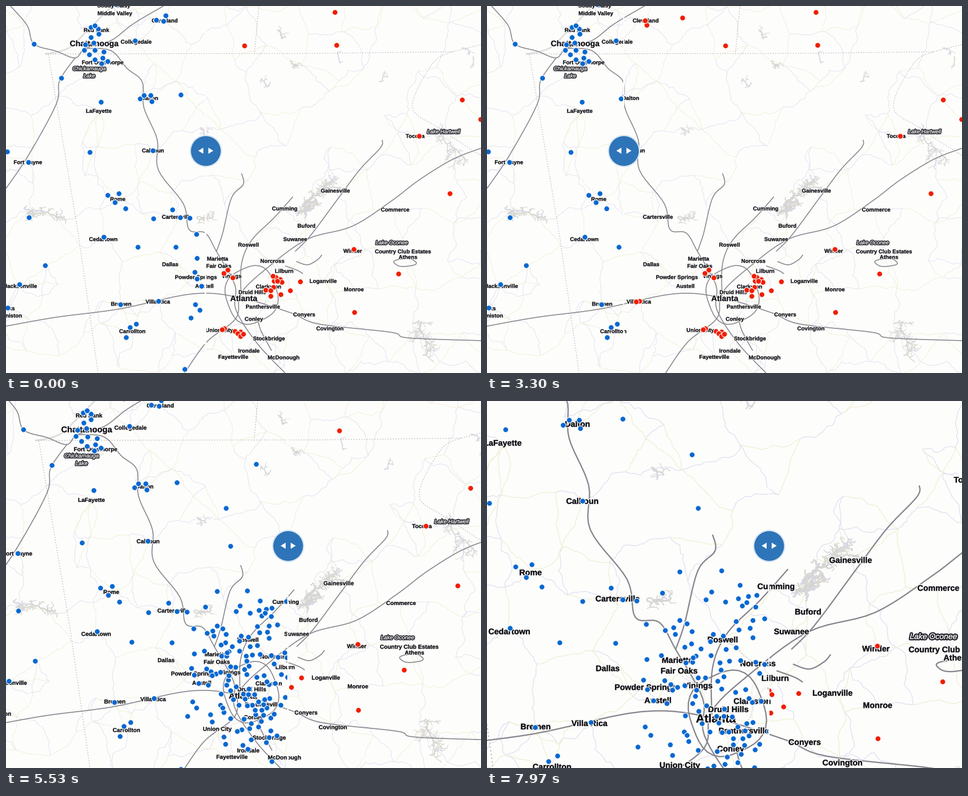
A matplotlib script for the animation above (8000 ms loop, 851 px wide and 658 px high).

```python
import math
import random

import numpy as np
import matplotlib.pyplot as plt
from matplotlib.animation import FuncAnimation
from matplotlib.collections import LineCollection, PathCollection
from matplotlib.patches import Circle, Polygon, Rectangle
from matplotlib.path import Path
from matplotlib.textpath import TextPath
from matplotlib.transforms import Bbox, TransformedBbox

W, H, DPI = 851, 658, 100
FRAMES, STEP = 200, 40
PX = 72 / DPI
CENTER = (460, 428.6)
PAPER = "#fdfdfc"

fig = plt.figure(figsize=(W / DPI, H / DPI), dpi=DPI, facecolor=PAPER)


def stage(z):
    ax = fig.add_axes([0, 0, 1, 1], zorder=z)
    ax.set_xlim(0, W)
    ax.set_ylim(H, 0)
    ax.axis("off")
    return ax


world, over = stage(1), stage(2)
scaled = []  # (collection, widths at zoom 1)


def add_lines(lines, widths, colors, z, **kw):
    col = LineCollection(lines, colors=colors, zorder=z, **kw)
    world.add_collection(col, autolim=False)
    scaled.append((col, np.atleast_1d(widths) * PX))


def smooth(pts, n=7):
    """Catmull-Rom curve through the points."""
    p = np.array([pts[0], *pts, pts[-1]], float)
    t = np.linspace(0, 1, n, endpoint=False)[:, None]
    out = []
    for a, b, c, d in zip(p, p[1:], p[2:], p[3:]):
        out.append(0.5 * (2 * b + (c - a) * t + (2 * a - 5 * b + 4 * c - d) * t**2
                          + (3 * b - a - 3 * c + d) * t**3))
    out.append(p[-1:])
    return np.vstack(out)


# ---- towns: name, label centre and, outside the metro area, number of sites
NORTH = [
    ("Soddy Daisy", 193, -1, 1), ("Middle Valley", 195, 13), ("Red Bank", 162, 43, 4),
    ("Cleveland", 284, 26, 3), ("Collegedale", 233, 64, 1), ("Fort Oglethorpe", 173, 101, 4),
    ("Dalton", 257, 165, 4), ("LaFayette", 166, 188), ("Calhoun", 263, 259, 1),
    ("Fort Payne", 39, 280, 1), ("Rome", 200, 346, 4), ("Cartersville", 306, 378, 2),
    ("Cedartown", 174, 418, 1), ("Gainesville", 590, 331, 2), ("Cumming", 499, 363, 1),
    ("Buford", 538, 394, 3), ("Suwanee", 518, 418, 1), ("Commerce", 697, 365, 2),
    ("Toccoa", 733, 233), ("Roswell", 434, 428),
]
SOUTH = [
    ("Dallas", 294, 463), ("Powder Springs", 340, 486), ("Austell", 355, 502),
    ("Bremen", 206, 534, 1), ("Villa Rica", 272, 530, 1), ("Carrollton", 226, 583, 3),
    ("Jacksonville", 26, 502, 1), ("Saks", 4, 542, 1), ("Anniston", 7, 555),
    ("Union City", 382, 581), ("Marietta", 379, 453), ("Fair Oaks", 381, 466),
    ("Vinings", 404, 484), ("Norcross", 477, 457), ("Lilburn", 498, 475),
    ("Clarkston", 470, 503), ("Druid Hills", 441, 513), ("Panthersville", 460, 539),
    ("Conley", 444, 561), ("Conyers", 534, 553, 4), ("Covington", 580, 578, 1),
    ("Stockbridge", 471, 596), ("Irondale", 435, 618), ("Fayetteville", 407, 629),
    ("McDonough", 497, 630), ("Winder", 621, 439, 1), ("Country Club Estates", 711, 440),
    ("Athens", 720, 450), ("Monroe", 623, 508, 1), ("Loganville", 568, 493, 1),
]
METROS = [("Chattanooga", 158, 67, 7), ("Atlanta", 426, 524)]
LAKE_NAMES = [("Chickamauga", 149, 112), ("Lake", 149, 125),
              ("Lake Hartwell", 784, 225), ("Lake Oconee", 691, 424)]
TOWNS = NORTH + SOUTH

# ---- faint back roads and streams, each place linked to its neighbours
rng = random.Random(11)


def rough(a, b, amp):
    """Straight run from a to b bent by midpoint displacement."""
    pts = [a, b]
    for _ in range(4):
        nxt = [pts[0]]
        for p, q in zip(pts, pts[1:]):
            d = math.dist(p, q) * amp
            nxt += [((p[0] + q[0]) / 2 + rng.gauss(0, d),
                     (p[1] + q[1]) / 2 + rng.gauss(0, d)), q]
        pts = nxt
    return pts


nodes = [town[1:3] for town in TOWNS + METROS]
for gx in range(-20, 900, 68):
    for gy in range(-20, 700, 66):
        nodes.append((gx + rng.uniform(-26, 26), gy + rng.uniform(-26, 26)))

links = set()
for i, p in enumerate(nodes):
    near = sorted(range(len(nodes)), key=lambda j: math.dist(p, nodes[j]))
    links |= {(min(i, j), max(i, j)) for j in near[1:4]}
links = sorted(links)
for part, bend, tint in ((links[1::2], 0.10, "#e1e0f0"), (links[::2], 0.07, "#f0efd2")):
    add_lines([rough(nodes[i], nodes[j], bend) for i, j in part], 0.9, tint, 1)

# ---- lakes grown as branching walks
rng = random.Random(4)
shore, shore_w, shore_c = [], [], []
TINTS = ("#d6d5d3", "#d6d5d3", "#d8d8e4", "#dedccb")


def lake(x, y, heading, n, w=1.8, depth=2):
    ang, pts = math.radians(heading), [(x, y)]
    for _ in range(n):
        a = ang + rng.gauss(0, 0.7)
        x, y = x + 3.2 * math.cos(a), y + 3.2 * math.sin(a)
        pts.append((x, y))
        if depth and rng.random() < 0.45:
            side = heading + rng.choice((-1, 1)) * rng.uniform(50, 100)
            lake(x, y, side, rng.randint(2, max(3, n // 3)), w * 0.75, depth - 1)
    shore.append(pts)
    shore_w.append(w)
    shore_c.append(rng.choice(TINTS))


for k in range(5):
    lake(520 + 3 * k, 376 - 5 * k, -32, 13, 2.8)
for arm in (-75, -45, -20):
    lake(560, 340, arm, 17)
for arm in (180, 200, 15):
    lake(72, 370, arm, 14, 2.4)
for arm in (10, -35):
    lake(342, 378, arm, 12)
lake(768, 222, 38, 30)
lake(746, 565, 82, 28)
for x, y in ((486, 42), (508, 100), (594, 82), (456, 130), (347, 218), (816, 76),
             (838, 90), (668, 135)):
    lake(x, y, rng.uniform(0, 70), 7)
add_lines(shore, shore_w, shore_c, 2)
add_lines([smooth([(190, 0), (140, 50), (118, 72), (94, 82), (70, 86)])], 2.6, "#deddd8", 2)

# ---- state lines
BORDERS = [
    [(70, 86), (560, 85), (800, 82), (851, 69)],
    [(76, 87), (130, 412), (165, 658)],
    [(453, 0), (445, 86)],
    smooth([(800, 82), (765, 102), (728, 180), (772, 217), (851, 268)]),
]
add_lines(BORDERS, 1.1, "#aeadb0", 3, linestyles=[(0, (1.5, 2.6))])

# ---- highways
highways = []


def road(*pts):
    highways.append(smooth(pts))


def ring(cx, cy, rx, ry):
    a = np.linspace(0, 2 * math.pi, 40)
    wob = 1 + 0.05 * np.sin(4 * a)
    highways.append(np.column_stack([cx + rx * wob * np.cos(a), cy + ry * wob * np.sin(a)]))


road((8, 0), (38, 35), (50, 68), (90, 81), (124, 93), (142, 76), (188, 62), (228, 32), (282, 0))
road((142, 76), (188, 80), (217, 112), (244, 136), (247, 182), (271, 240), (273, 294),
     (318, 355), (328, 401), (357, 407), (377, 440), (410, 500), (412, 545), (450, 605),
     (500, 658))
road((124, 93), (96, 134), (90, 176), (40, 268), (0, 327))
road((0, 574), (90, 558), (204, 543), (335, 516), (420, 523), (510, 550), (560, 570),
     (690, 585), (720, 595), (851, 600))
road((320, 658), (360, 602), (412, 560), (421, 515), (470, 468), (540, 418), (620, 395),
     (690, 350), (740, 312), (800, 275), (851, 255))
road((518, 440), (546, 411), (598, 341), (635, 292), (671, 254), (674, 240))
road((421, 520), (422, 462), (440, 420), (480, 380), (514, 342))
road((377, 440), (388, 408), (404, 344), (425, 320), (422, 300))
road((452, 567), (458, 585), (476, 618))
road((500, 466), (522, 474), (532, 480))
road((520, 458), (540, 464), (558, 455), (566, 446))
ring(440, 518, 47, 52)
ring(715, 460, 20, 7)
add_lines(highways, 1.6, "#87868d", 4)


# ---- labels as outlines, so they grow with the map
def outline(town, size, **font):
    name, x, y = town[:3]
    tp = TextPath((0, 0), name, size=size, prop=dict(family="Liberation Sans", **font))
    v = tp.vertices
    mid = (v[:, 0].min() + v[:, 0].max()) / 2
    return Path(np.column_stack([v[:, 0] - mid + x, y + 0.35 * size - v[:, 1]]), tp.codes)


def add_labels(paths, ink, halo, halo_w, z):
    for color, width, dz in ((halo, halo_w, 0), (ink, 0.3, 0.1)):
        col = PathCollection(paths, facecolors=color, edgecolors=color, zorder=z + dz)
        world.add_collection(col, autolim=False)
        scaled.append((col, np.array([width * PX])))


add_labels([outline(c, 9.9, weight="bold") for c in TOWNS]
           + [outline(c, 14.3, weight="bold") for c in METROS],
           "#0c0c12", PAPER, 2.2, 5)
add_labels([outline(c, 9.7, style="italic") for c in LAKE_NAMES],
           "#f4f4f4", "#1c1c24", 3.2, 6)

# ---- sites
rng = random.Random(23)


def scatter(x, y, sx, sy, n, gap=7):
    """n seeded points around (x, y), kept at least gap apart."""
    pts = []
    while len(pts) < n:
        p = rng.gauss(x, sx), rng.gauss(y, sy)
        if all(math.dist(p, q) > gap for q in pts):
            pts.append(p)
    return pts


blue_pts = [
    (50, 68), (99, 129), (170, 172), (313, 159), (150, 262), (2, 261), (41, 379),
    (70, 465), (236, 432), (320, 651), (397, 203), (405, 268), (449, 127), (535, 45),
    (610, 98), (547, 245), (609, 229), (678, 238), (507, 289), (524, 313), (654, 393),
    (698, 457), (692, 579),
]
for _, x, y, *count in TOWNS + METROS:
    n = count[0] if count else 0
    spread = 1.5 + 3.5 * math.sqrt(max(n - 1, 0))
    blue_pts += scatter(x, y, 1.4 * spread, spread, n)
blue_pts += scatter(438, 440, 62, 42, 82)
blue_pts += scatter(440, 560, 38, 42, 62)

red_pts = [
    (427, 71), (589, 11), (592, 70), (817, 168), (850, 203), (740, 233), (795, 336),
    (623, 436), (703, 480), (624, 549), (350, 21), (527, 494), (509, 510),
]
for cx, cy, sx, sy, n in ((481, 507, 10, 12, 11), (390, 478, 7, 5, 3), (419, 588, 6, 5, 5),
                          (384, 579, 4, 1, 2), (286, 30, 4, 6, 2), (273, 529, 5, 1, 2)):
    red_pts += scatter(cx, cy, sx, sy, n, 5)


def dots(pts, color):
    xs, ys = np.array(pts).T - 0.5
    layer = world.scatter(xs, ys, s=(9.8 * PX) ** 2, c=color, edgecolors="white",
                          linewidths=1.1 * PX, zorder=8)
    layer.set_clip_path(None)
    return layer


blue = dots(blue_pts, "#0868d0")
red = dots(red_pts, "#f01e00")

# ---- swipe handle
seam = over.add_patch(Rectangle((0, 0), 2.4, H, fc=PAPER, lw=0))
rim = over.add_patch(Circle((0, 260), 28.2, fc="white", ec="#b9d4ec", lw=0.9 * PX))
knob = over.add_patch(Circle((0, 260), 26.8, fc="#2e74b8", lw=0))
ARROW = np.array([(13.5, 0), (4.5, -5.5), (4.5, 5.5)])
arrows = [over.add_patch(Polygon(ARROW, fc="white", lw=0)) for _ in range(2)]

SWIPE = [(0, 358), (2000, 709), (3300, 245), (4600, 505.5)]


def ease(u):
    return (1 - math.cos(math.pi * min(max(u, 0), 1))) / 2


def swipe_x(t):
    for (t0, a), (t1, b) in zip(SWIPE, SWIPE[1:]):
        if t <= t1:
            return a + (b - a) * ease((t - t0) / (t1 - t0))
    return SWIPE[-1][1]


def zoom_at(t):
    u = min(max((t - 4870) / 2610, 0), 1)
    return 1 + 0.47 * ease(u**1.16)


def clip(layer, x0, x1):
    layer.set_clip_box(TransformedBbox(Bbox([[x0, H], [x1, 0]]), over.transData))


def draw(i):
    t = i * STEP
    x, s = swipe_x(t), zoom_at(t)
    cx, cy = CENTER
    world.set_xlim(cx - cx / s, cx + (W - cx) / s)
    world.set_ylim(cy + (H - cy) / s, cy - cy / s)
    for col, widths in scaled:
        col.set_linewidth(widths * s)
    clip(blue, 0, x - 1)
    clip(red, x, W)
    seam.set_x(x - 1.7)
    rim.center = knob.center = (x, 260)
    for arrow, side in zip(arrows, (-1, 1)):
        arrow.set_xy(ARROW * (side, 1) + (x, 259.5))
    return []


anim = FuncAnimation(fig, draw, frames=FRAMES, interval=STEP, init_func=lambda: draw(0),
                     repeat=True, repeat_delay=0, blit=False)
plt.show()
```
